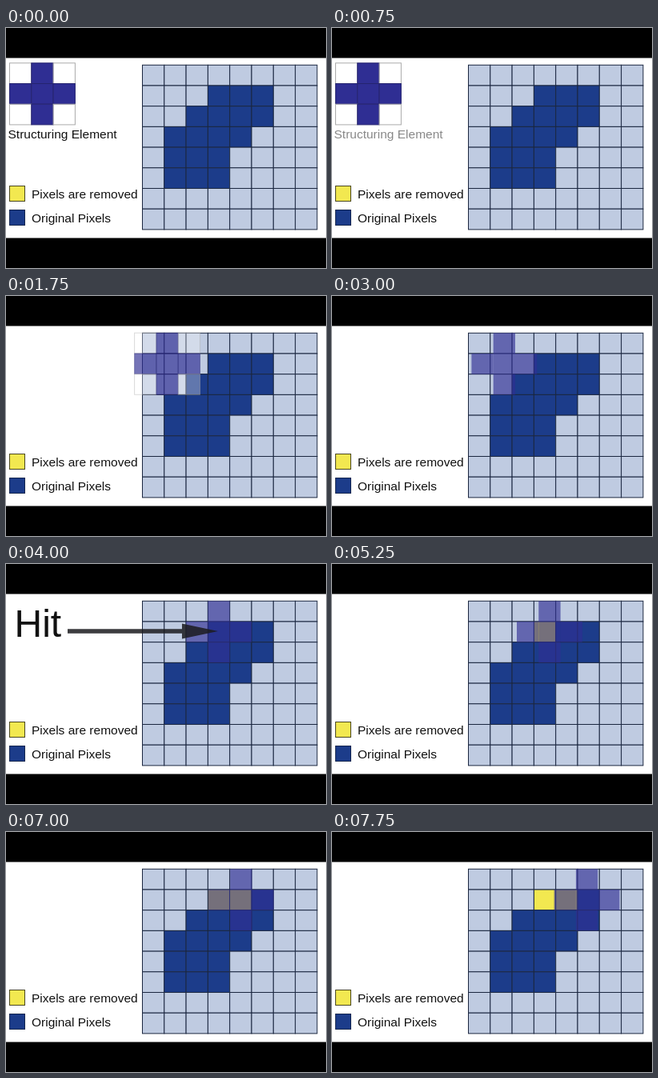
An HTML page with a canvas for the animation above (8000 ms loop, 400 by 300 pixels).

```html
<!DOCTYPE html>
<html>
<head>
<meta charset="utf-8">
<style>
html, body { margin: 0; width: 100%; height: 100%; overflow: hidden; background: #fff; }
canvas { display: block; }
</style>
</head>
<body>
<canvas id="stage" width="400" height="300"></canvas>
<script>
const ctx = document.getElementById('stage').getContext('2d');
const LOOP = 8000, STEP = 250;
const GRID = { x: 170.5, y: 46.3, size: 8 };
const CELL = { w: 27.3, h: 25.7 };
const LIGHT = '#bfcbe1', BLUE = '#1c3c8a', YELLOW = '#f2e850', PURPLE = '#2f2e93';
// First and last filled column of each row
const SHAPE = { 1: [3, 5], 2: [2, 5], 3: [1, 4], 4: [1, 3], 5: [1, 3] };

const progress = (t, from, to) => Math.min(1, Math.max(0, (t - from) / (to - from)));
const ease = (t, from, to) => {
  const p = progress(t, from, to);
  return p * p * (3 - 2 * p);
};
const mix = (a, b, p) => a + (b - a) * p;

function rect(x, y, w, h, fill, stroke) {
  if (fill) {
    ctx.fillStyle = fill;
    ctx.fillRect(x, y, w, h);
  }
  if (stroke) {
    ctx.strokeStyle = stroke;
    ctx.strokeRect(x, y, w, h);
  }
}

function text(string, x, y, size = 15.5) {
  ctx.font = `${size}px "Liberation Sans", Arial, sans-serif`;
  ctx.fillStyle = '#111';
  ctx.fillText(string, x, y);
}

function drawGrid(t) {
  for (let row = 0; row < GRID.size; row++) {
    const [first, last] = SHAPE[row] || [9, 9];
    for (let col = 0; col < GRID.size; col++) {
      const removed = row === 1 && (col === 3 && t >= 4400 || col === 4 && t >= 6450);
      const fill = removed ? YELLOW : col >= first && col <= last ? BLUE : LIGHT;
      rect(GRID.x + col * CELL.w, GRID.y + row * CELL.h, CELL.w, CELL.h, fill, '#1b2740');
    }
  }
}

function drawCross(t) {
  const entry = ease(t, 890, 1900);
  const column = 2 * ease(t, 2837, 3837) + ease(t, 4950, 5950) + ease(t, 6920, 7920);
  const left = mix(4.5, GRID.x, entry) + column * CELL.w;
  const top = mix(43.8, GRID.y, entry);
  const frame = 1 - progress(t, 900, 2400);
  for (let i = 0; i < 9; i++) {
    const x = left + i % 3 * CELL.w, y = top + (i / 3 | 0) * CELL.h;
    const arm = i % 2 === 1 || i === 4;
    ctx.globalAlpha = arm ? mix(1, 0.64, entry) : frame * 0.7;
    rect(x, y, CELL.w, CELL.h, arm ? PURPLE : '#fff');
    ctx.globalAlpha = frame;
    rect(x, y, CELL.w, CELL.h, null, arm ? '#25246f' : '#aaa');
  }
  ctx.globalAlpha = 1;
}

function drawHit(tip) {
  text('Hit', 10.5, 91, 48);
  ctx.fillStyle = 'rgba(28, 28, 32, 0.86)';
  ctx.beginPath();
  ctx.moveTo(77, 81.2);
  ctx.lineTo(tip - 45, 81.2);
  ctx.lineTo(tip - 45, 74.5);
  ctx.lineTo(tip, 84);
  ctx.lineTo(tip - 45, 93.5);
  ctx.lineTo(tip - 45, 86.8);
  ctx.lineTo(77, 86.8);
  ctx.fill();
}

function draw(t) {
  ctx.lineWidth = 1;
  rect(0, 0, 400, 300, '#000');
  rect(0, 37.5, 400, 225, '#fff');

  ctx.globalAlpha = 1 - progress(t, 250, 1250);
  text('Structuring Element', 2.5, 138);
  ctx.globalAlpha = 1;

  rect(4.5, 197.5, 19, 19, YELLOW, '#4a4720');
  text('Pixels are removed', 32, 213);
  rect(4.5, 227.5, 19, 19, BLUE, '#14264f');
  text('Original Pixels', 32, 243);

  drawGrid(t);
  drawCross(t);
  if (t >= 3850 && t < 4930) drawHit(265);
  if (t >= 6050 && t < 6920) drawHit(265 + CELL.w);
}

function tick() {
  const t = performance.now() % LOOP;
  draw(Math.floor(t / STEP) * STEP);
  requestAnimationFrame(tick);
}
tick();
</script>
</body>
</html>
```
